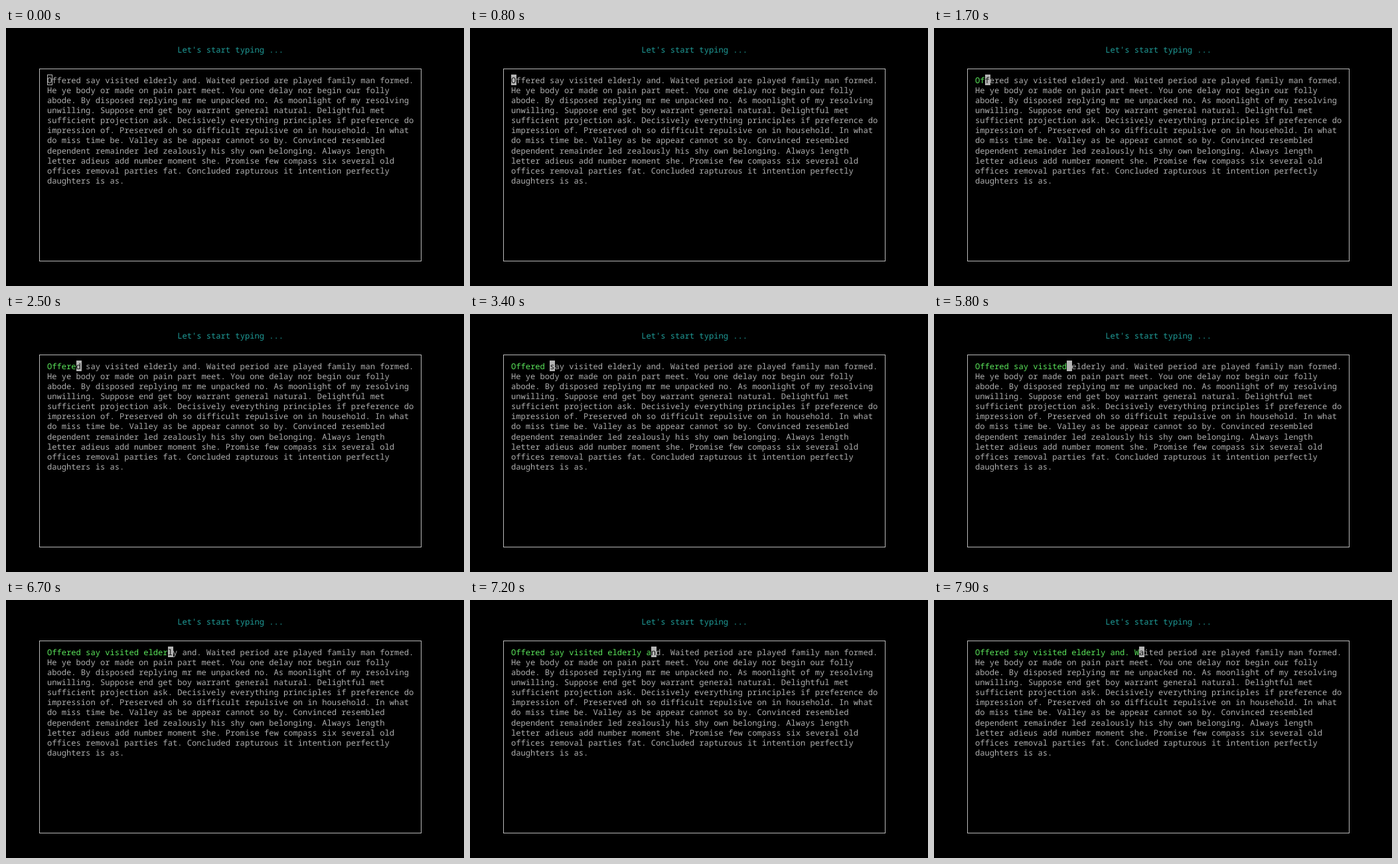
Recreate the animation shown at these times as an HTML page. Size 690 px wide and 388 px high, loop 8 s.

```html
<!DOCTYPE html>
<html lang="en">
<head>
<meta charset="utf-8">
<title>Typing test</title>
<style>
  html, body {
    margin: 0;
    width: 100%;
    height: 100%;
    overflow: hidden;
    background: #000;
  }
  #stage {
    position: relative;
    width: 690px;
    height: 388px;
    overflow: hidden;
    background: #000;
    color: #aeaeae;
    font: 12.127px/15.16px "Noto Sans Mono", monospace;
    text-rendering: geometricPrecision;
    font-variant-ligatures: none;
  }
  #stage > * { position: absolute; margin: 0; white-space: pre; font: inherit; }
  #title { left: 258.2px; top: 24.8px; color: #1f9c98; }
  #frame {
    left: 50px;
    top: 61px;
    width: 574px;
    height: 288px;
    border: 1px solid #b9b9b9;
  }
  #text { left: 62px; top: 70.55px; }
  #cursor {
    left: 62px;
    top: 70px;
    box-sizing: border-box;
    width: 8px;
    height: 16px;
    border: 1px solid #b4b4b4;
  }
  .focused #cursor { background: #b4b4b4; }
  .focused #under { color: #111; }
  #done { color: #5be65b; }
</style>
</head>
<body>
<div id="stage">
  <h1 id="title">Let's start typing ...</h1>
  <div id="frame"></div>
  <div id="cursor"></div>
  <p id="text"><span id="done"></span><span id="under"></span><span id="rest"></span></p>
</div>
<script>
  const LOOP = 8000, FOCUS_AT = 500, CELL = 7.276;

  const text = `Offered say visited elderly and. Waited period are played family man formed.
He ye body or made on pain part meet. You one delay nor begin our folly
abode. By disposed replying mr me unpacked no. As moonlight of my resolving
unwilling. Suppose end get boy warrant general natural. Delightful met
sufficient projection ask. Decisively everything principles if preference do
impression of. Preserved oh so difficult repulsive on in household. In what
do miss time be. Valley as be appear cannot so by. Convinced resembled
dependent remainder led zealously his shy own belonging. Always length
letter adieus add number moment she. Promise few compass six several old
offices removal parties fat. Concluded rapturous it intention perfectly
daughters is as.`;

  // Time of each key press, in ms
  const keys = [
    1300, 1600, 1900, 2100, 2300, 2500, 2700, 3400,
    3600, 3800, 4000, 4300, 4700, 4800, 5000, 5200, 5300,
    5500, 5700, 5900, 6100, 6300, 6500, 6700, 6700,
    6900, 7000, 7100, 7200, 7400, 7400, 7600, 7800, 7900
  ];

  const [stage, cursor, done, under, rest] =
    ["stage", "cursor", "done", "under", "rest"].map(id => document.getElementById(id));
  let shown = -1;

  function showTyped(n) {
    done.textContent = text.slice(0, n);
    under.textContent = text[n];
    rest.textContent = text.slice(n + 1);
    cursor.style.left = `${62 + n * CELL}px`;
    shown = n;
  }

  function draw() {
    const t = performance.now() % LOOP;
    const typed = keys.filter(k => k <= t).length;
    if (typed !== shown) showTyped(typed);
    stage.classList.toggle("focused", t >= FOCUS_AT);
    requestAnimationFrame(draw);
  }
  draw();
</script>
</body>
</html>
```
